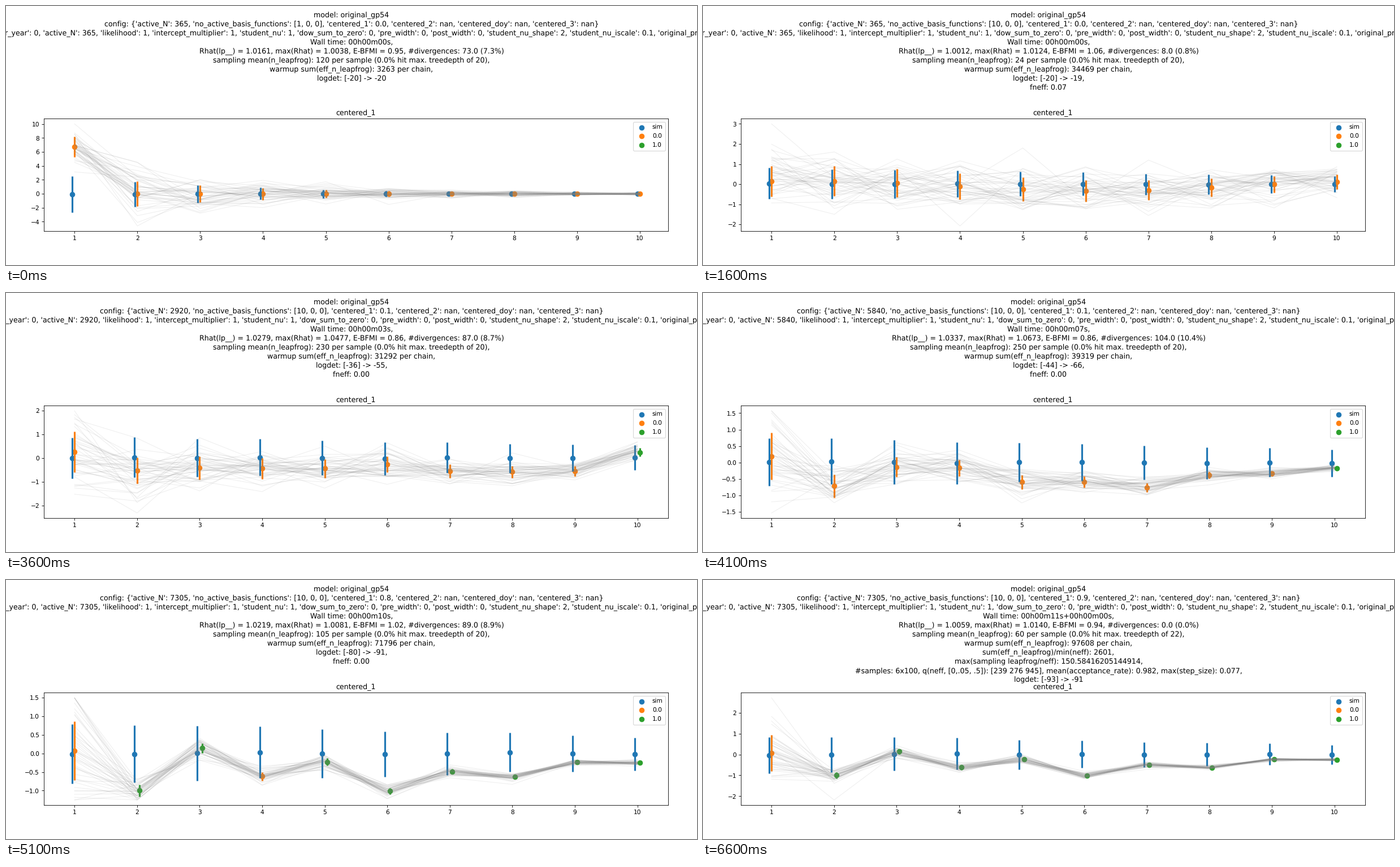
A matplotlib script for the animation above (7100 ms loop, 1222 by 458 pixels).

```python
import numpy as np
import matplotlib.pyplot as plt
from matplotlib.animation import FuncAnimation

W, H = 1222, 458
DPI = W / 16
plt.rcParams["font.family"] = "DejaVu Sans"
plt.rcParams["text.hinting"] = "no_hinting"
X = np.arange(1, 11)
DODGE = 0.04
LAST = 14

# The fit runs through stages 0..14; values are interpolated between these.
KEYS = [0, 2, 4, 6, 9, 11, 14]
LATE = np.array([0.07, -1.0, 0.14, -0.62, -0.23, -1.01, -0.49, -0.63, -0.24, -0.25])
MEANS = np.array([
    6.7 * (X == 1),
    1.6 * np.cos(X - 1.3) * (X < 5),
    -0.09 - 0.25 * np.cos(0.68 * (X - 6.2)),
    -0.35 + 0.75 * np.cos(0.4 * np.pi * (X - 6)) + 1.2 * (X == 10),
    [0.19, -0.72, -0.14, -0.17, -0.6, -0.59, -0.76, -0.39, -0.34, -0.18],
    LATE, LATE])
CENTERING_ORDER = [10, 9, 8, 7, 6, 5, 3, 2, 4, 1]


def at(s, *values):
    return np.interp(s, KEYS, values)


def centered(s):
    return 0.0 if s < 8 else 0.1 if s < 10 else 0.8 if s < 12 else 0.9


def active_n(s):
    doublings = max(0, min(s - 4, (s - 1) // 2))
    return min(365 * 2 ** doublings, 7305)


def header(s):
    n, final = active_n(s), s == LAST
    seconds = round(10 * (n / 7305) ** 1.5) + s // 13
    lp = at(s, 1.0161, 0.9997, 1.0012, 1.0162, 1.0337, 1.0219, 1.0059)
    rmax = at(s, 1.0038, 1.0087, 1.0124, 1.0084, 1.0673, 1.0081, 1.0140)
    bfmi = at(s, 0.95, 1.00, 1.06, 0.87, 0.86, 1.02, 0.94)
    div = round(at(s, 73, 3, 8, 54, 104, 89, 0))
    leaps = at(s, 120, 17, 24, 191, 250, 105, 60)
    warmup = at(s, 3263, 26372, 34469, 15239, 39319, 71796, 97608)
    before = at(s, -20, -20, -20, -20, -44, -80, -93)
    after = at(s, -20, -20, -19, -33, -66, -91, -91)
    lines = [
        "model: original_gp54",
        f"config: {{'active_N': {n}, "
        f"'no_active_basis_functions': [{min(10, 2 ** s)}, 0, 0], "
        f"'centered_1': {centered(s)}, 'centered_2': nan, "
        "'centered_doy': nan, 'centered_3': nan}",
        f"r_year': 0, 'active_N': {n}, 'likelihood': 1, "
        "'intercept_multiplier': 1, 'student_nu': 1, 'dow_sum_to_zero': 0, "
        "'pre_width': 0, 'post_width': 0, 'student_nu_shape': 2, "
        "'student_nu_iscale': 0.1, 'original_prior': 0",
        f"Wall time: 00h00m{seconds:02d}s" + ("+00h00m00s," if final else ","),
        f"Rhat(lp__) = {lp:.4f}, max(Rhat) = {rmax:.4f}, "
        f"E-BFMI = {bfmi:.2f}, #divergences: {div:.1f} ({div / 10:.1f}%)",
        f"sampling mean(n_leapfrog): {leaps:.0f} per sample "
        f"(0.0% hit max. treedepth of {22 if final else 20}),",
        f"warmup sum(eff_n_leapfrog): {warmup:.0f} per chain,"]
    logdet = f"logdet: [{before:.0f}] -> {after:.0f}"
    if final:
        lines += ["sum(eff_n_leapfrog)/min(neff): 2601,",
                  "max(sampling leapfrog/neff): 150.58416205144914,",
                  "#samples: 6x100, q(neff, [0,.05, .5]): [239 276 945], "
                  "mean(acceptance_rate): 0.982, max(step_size): 0.077,",
                  logdet]
    elif s == 0:
        lines.append(logdet)
    else:
        fneff = at(s, 0, 0, 0.07, 0, 0, 0, 0)
        lines += [logdet + ",", f"fneff: {fneff:.2f}"]
    return lines


def spreads(s):
    """Prior and posterior standard deviation of every coefficient."""
    first = at(s, 2.6, 1.5, 0.77, 1.12, 0.72, 0.79, 0.87)
    last = at(s, 0.09, 0.45, 0.4, 0.73, 0.41, 0.44, 0.46)
    power = min(1 + 0.15 * s, 1.35)
    prior = first * (last / first) ** (((X - 1) / 9) ** power)
    near = at(s, 1, 1, 1, 0.95, 0.5, 0.2, 0.18)
    far = at(s, 1, 1, 0.9, 0.8, 0.12, 0.07, 0.07)
    shrink = near + (far - near) * (X - 2) / 8
    shrink[0] = min(1, 0.56 + 0.22 * s)
    return prior, prior * shrink


def sample_paths(rng, mean, sd, low, high):
    paths = np.clip(rng.normal(mean, sd, (45, 10)), low, high)
    paths.flat[paths.argmax()] = high
    paths.flat[paths.argmin()] = low
    return paths


fig = plt.figure(figsize=(16, H / DPI), dpi=DPI, facecolor="white")
L, R, T, B = 66.6, 1171.2, 199.4, 398.0
ax = fig.add_axes([L / W, 1 - B / H, (R - L) / W, (B - T) / H])
heading = [fig.text(0.5, 1 - (20 + 16.05 * i) / H, "", size=11.95,
                    ha="center", va="baseline") for i in range(11)]
heading[2].set_ha("left")


def points(x, mean, sd, color, label):
    ax.vlines(x, mean - sd, mean + sd, color=color, lw=3, zorder=2)
    ax.scatter(x, mean, s=64, color=color, label=label, zorder=1)


def draw_stage(s):
    rng = np.random.default_rng(40 + s)
    mean = np.array([at(s, *column) for column in MEANS.T])
    prior_sd, sd = spreads(s)
    low = at(s, -4.61, -4.38, -2.08, -3.82, -1.54, -1.25, -2.18)
    high = at(s, 10.02, 6.24, 3.0, 2.8, 1.57, 1.49, 2.72)
    prior_mean = 0.03 * prior_sd * rng.standard_normal(10)
    green = np.isin(X, CENTERING_ORDER[:round(10 * centered(s))])

    ax.clear()
    points(X - DODGE, prior_mean, prior_sd, "tab:blue", "sim")
    points(X[~green], mean[~green], sd[~green], "tab:orange", "0.0")
    points(X[green] + DODGE, mean[green], sd[green], "tab:green", "1.0")
    paths = sample_paths(rng, mean, sd, low, high)
    ax.plot(X, paths.T, color="gray", alpha=0.13, lw=1, zorder=2)

    left, right = 1 - DODGE, 10 + DODGE * green.any()
    ax.set_xlim(left - 0.05 * (right - left), right + 0.05 * (right - left))
    ax.set_ylim(low - 0.05 * (high - low), high + 0.05 * (high - low))
    ax.set_xticks(X)
    ax.set_title("centered_1", size=11.95)
    crowded = mean[-1] + sd[-1] > 0.4 * high
    ax.legend(loc="lower right" if crowded else "upper right")

    lines = header(s)
    for i, text in enumerate(heading):
        text.set_text(lines[i] if i < len(lines) else "")
    heading[2].set_x((-2.5 if active_n(s) < 1000 else -6.5) / W)


shown = [None]


def update(frame):
    s = (frame + 4) // 5
    if s != shown[0]:
        draw_stage(s)
        shown[0] = s
    return []


def start():
    shown[0] = None
    return update(0)


anim = FuncAnimation(fig, update, frames=71, interval=100, init_func=start,
                     repeat=True, repeat_delay=0, blit=False)
plt.show()
```
